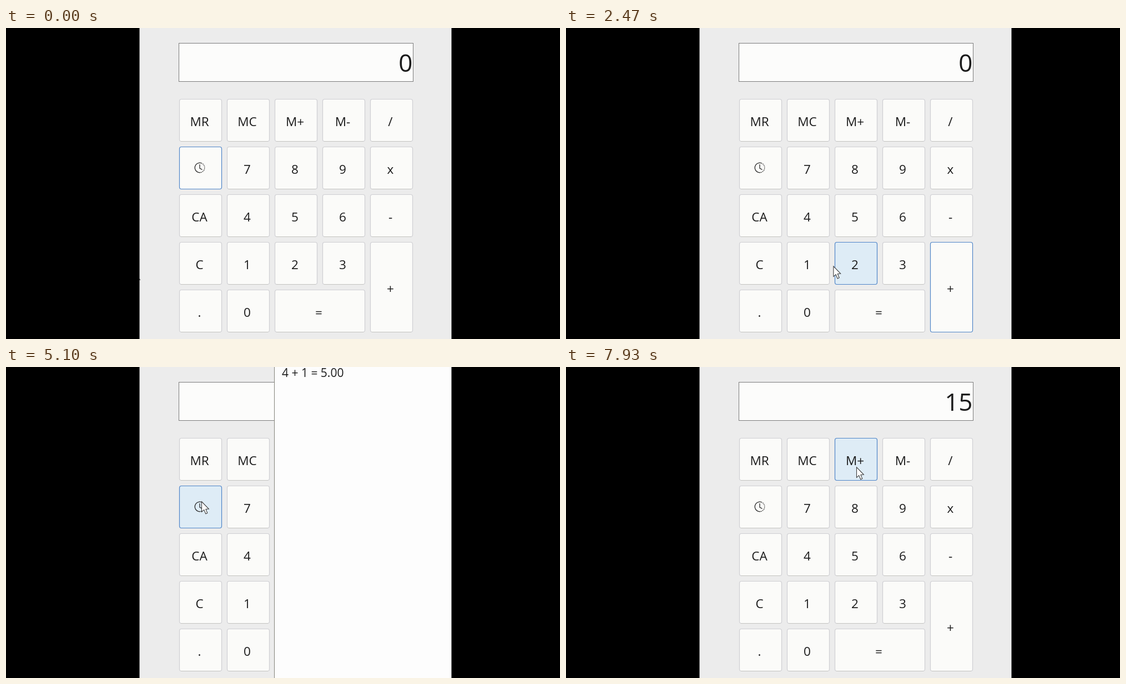
Animation, 998 px wide and 561 px high, one loop 8 s. Source, as an HTML page with a canvas:

```html
<!DOCTYPE html>
<html lang="en">
<head>
<meta charset="utf-8">
<title>Calculator</title>
<style>
  html, body { margin: 0; width: 100%; height: 100%; overflow: hidden; background: #000; }
  canvas { display: block; }
</style>
</head>
<body>
<canvas id="stage" width="998" height="561"></canvas>
<script>
const ctx = document.getElementById('stage').getContext('2d');
const LOOP = 8000;
const HOVER_LAG = 30;
const FONT = '"Open Sans", "Noto Sans", sans-serif';
const APP = { left: 240.5, right: 802.5, height: 561 };
const PANEL = { x: 483, w: 319 };
const INK = '#1b1b1b';

// Keypad: one string per row; wide and tall keys are added separately.
const PITCH = 86, SIZE = 76;
const rows = [
  ['MR', 'MC', 'M+', 'M-', '/'],
  ['clock', '7', '8', '9', 'x'],
  ['CA', '4', '5', '6', '-'],
  ['C', '1', '2', '3'],
  ['.', '0']
];
const makeKey = (label, col, row, w = SIZE, h = SIZE) =>
  ({ label, x: 312 + col * PITCH, y: 128 + row * PITCH, w, h });
const keys = rows.flatMap((row, r) => row.map((label, c) => makeKey(label, c, r)));
keys.push(makeKey('+', 4, 3, SIZE, SIZE + PITCH), makeKey('=', 2, 4, SIZE + PITCH));

// Pointer moves: start, end, target x, target y.
const pointerStart = [228, 440];
const moves = [
  [150, 1000, 436, 340],
  [1400, 1700, 650, 497],
  [1700, 1850, 692, 476],
  [2100, 2607, 436, 419],
  [2850, 3150, 560, 486],
  [3550, 4281, 352, 242],
  [5870, 6100, 352, 172],
  [6480, 6690, 484, 187],
  [6690, 6990, 523, 180]
];

// Clicks: time, key, and the display text that follows.
const clicks = [
  [0, 'clock', '0'],
  [1150, '4', '4'],
  [1900, '+', '0'],
  [2720, '1', '1'],
  [3420, '=', '5.00'],
  [4350, 'clock', '5.00'],
  [5350, 'clock', '5.00'],
  [6200, 'MR', '5.00'],
  [7450, 'M+', '15']
];

const clamp = v => Math.max(0, Math.min(1, v));
const smooth = v => v * v * (3 - 2 * v);
const progress = (t, a, b) => smooth(clamp((t - a) / (b - a)));

function pointerAt(t) {
  let [x, y] = pointerStart;
  for (const [a, b, tx, ty] of moves) {
    if (t < a) break;
    const p = progress(t, a, b);
    x += (tx - x) * p;
    y += (ty - y) * p;
  }
  return { x, y };
}

function text(str, x, y, size, align = 'center') {
  ctx.font = `${size}px ${FONT}`;
  ctx.textAlign = align;
  ctx.fillStyle = INK;
  ctx.fillText(str, x, y);
}

function drawClock(x, y) {
  ctx.strokeStyle = '#2a2a2a';
  ctx.lineWidth = 1.3;
  ctx.beginPath();
  ctx.arc(x, y, 8.8, Math.PI * 0.45, Math.PI * 1.6);
  ctx.stroke();
  ctx.setLineDash([1.6, 1.4]);
  ctx.beginPath();
  ctx.arc(x, y, 8.8, Math.PI * 1.6, Math.PI * 2.45);
  ctx.stroke();
  ctx.setLineDash([]);
  ctx.beginPath();
  ctx.moveTo(x, y - 6);
  ctx.lineTo(x, y + 1);
  ctx.lineTo(x + 4.5, y + 3.5);
  ctx.stroke();
}

function drawKey(key, hover, focus) {
  const { label, x, y, w, h } = key;
  ctx.beginPath();
  ctx.roundRect(x + 0.5, y + 0.5, w, h, 3.5);
  ctx.fillStyle = hover ? '#deecf6' : '#fbfbf9';
  ctx.fill();
  ctx.lineWidth = 1.2;
  ctx.strokeStyle = hover || focus ? '#4f85c8' : '#cfcfd3';
  ctx.stroke();
  if (!hover && !focus) {
    ctx.fillStyle = '#c3c3c0';
    ctx.fillRect(x + 3, y + h, w - 5, 1);
  }
  const cx = x + w / 2 - 1;
  if (label === 'clock') drawClock(cx, y + 38);
  else text(label, cx - 0.5, y + h / 2 + 10.5, 22.5);
}

function drawPointer({ x, y }) {
  const outline = [[0, 0], [0, 18.5], [4.2, 14.8], [7.3, 22], [10.3, 20.6], [7.4, 13.6], [12.8, 13.2]];
  ctx.beginPath();
  outline.forEach(([dx, dy]) => ctx.lineTo(x + dx + 0.5, y + dy + 0.8));
  ctx.closePath();
  ctx.fillStyle = '#fff';
  ctx.fill();
  ctx.lineWidth = 1.1;
  ctx.strokeStyle = '#3a3a3a';
  ctx.stroke();
}

function drawPanel(open) {
  if (open <= 0) return;
  const x = Math.round(PANEL.x + PANEL.w * (1 - open));
  ctx.fillStyle = '#fdfdfd';
  ctx.fillRect(x, 0, PANEL.w, APP.height);
  ctx.fillStyle = '#85857c';
  ctx.fillRect(x, 0, 1, APP.height);
  text('4 + 1 = 5.00', x + 14, 18, 21, 'left');
}

function draw(t) {
  const pointer = pointerAt(t);
  const probe = pointerAt(t - HOVER_LAG);
  const [, focused, display] = clicks.filter(c => c[0] <= t).pop();

  ctx.fillStyle = '#ececec';
  ctx.fillRect(0, 0, 998, 561);

  ctx.fillStyle = '#fcfcfb';
  ctx.fillRect(311, 27, 423, 70);
  ctx.lineWidth = 1;
  ctx.strokeStyle = '#7c7c7c';
  ctx.strokeRect(311.5, 27.5, 422, 69);
  text(display, 732.5, 78.5, 44, 'right');

  for (const key of keys) {
    const hover = probe.x >= key.x && probe.x <= key.x + key.w &&
                  probe.y >= key.y && probe.y <= key.y + key.h;
    drawKey(key, hover, key.label === focused);
  }

  drawPanel(progress(t, 4400, 4750) - progress(t, 5400, 5700));
  drawPointer(pointer);

  ctx.fillStyle = '#000';
  ctx.fillRect(0, 0, APP.left, APP.height);
  ctx.fillRect(APP.right, 0, 998 - APP.right, APP.height);
}

const start = performance.now();
function frame() {
  draw((performance.now() - start) % LOOP);
  requestAnimationFrame(frame);
}
frame();
</script>
</body>
</html>
```
